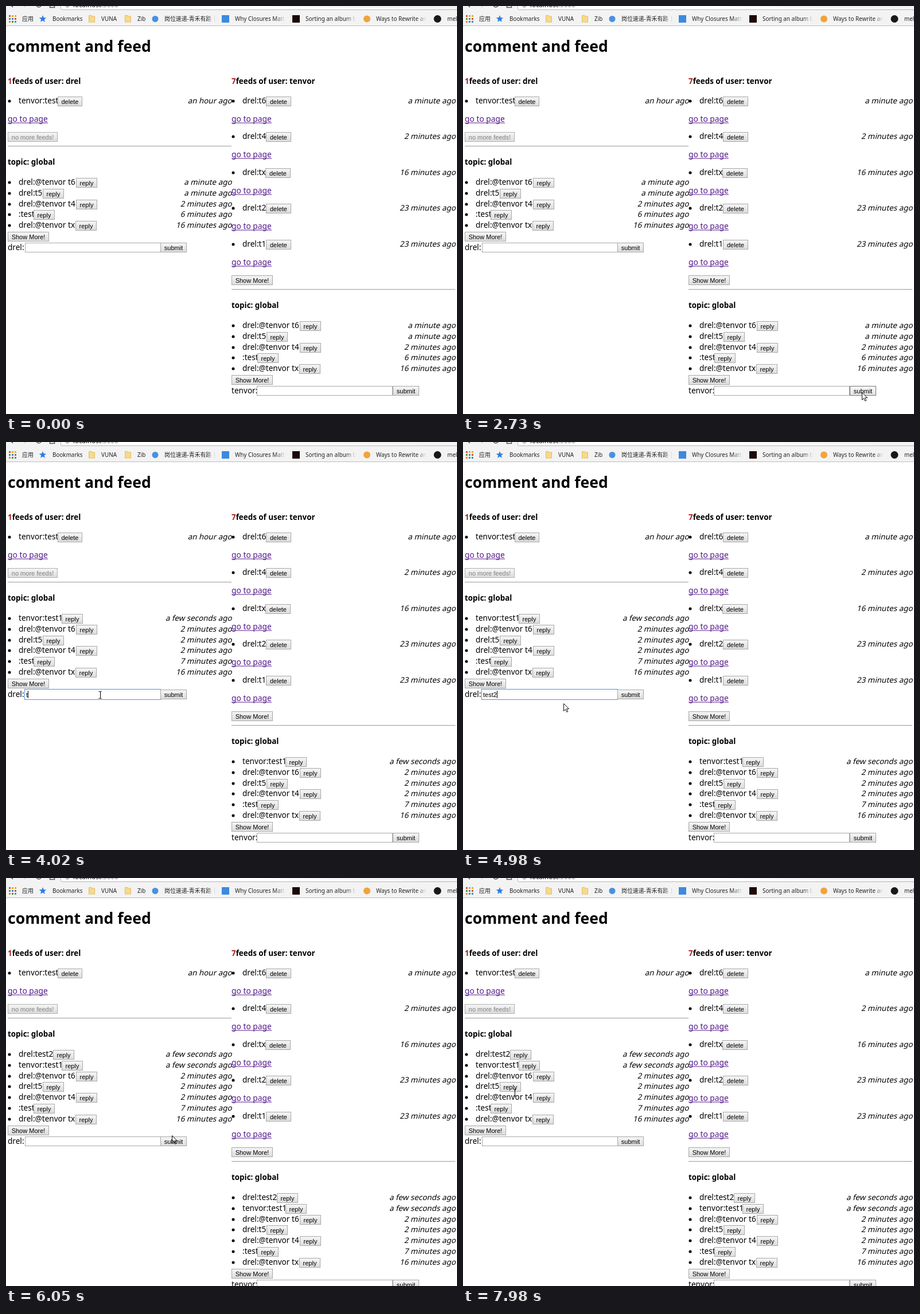
Animation, 786 px wide and 712 px high, one loop 8000 ms. Source, as an HTML page:

```html
<!DOCTYPE html>
<html lang="en">
<head>
<meta charset="utf-8">
<title>comment and feed</title>
<style>
  html, body { margin: 0; width: 100%; height: 100%; overflow: hidden; background: #fff; }
  svg { display: block; }
  text { font: 13.6px 'Noto Sans', 'Noto Sans CJK SC', 'Noto Sans CJK JP', sans-serif; white-space: pre; }
  .h1 { font-size: 26.6px; font-weight: 700; }
  .h4 { font-size: 13.4px; font-weight: 700; }
  .count { fill: #b01e1e; }
  .link { font-size: 13.8px; fill: #551a8b; }
  .age { font-size: 13.4px; text-anchor: end; }
  .ui { font: 11px 'Liberation Sans', Arial, sans-serif; }
  .label { text-anchor: middle; }
  .mark { font-size: 9.9px; fill: #222; }
  .url { font-size: 11.6px; }
</style>
</head>
<body>
<svg id="stage" width="786" height="712" viewBox="0 0 786 712">
  <defs>
    <linearGradient id="face" x2="0" y2="1"><stop stop-color="#f6f6f6"/><stop offset="1" stop-color="#dcdcdc"/></linearGradient>
    <linearGradient id="hover" x2="0" y2="1"><stop stop-color="#fafafa"/><stop offset="1" stop-color="#e2e2e2"/></linearGradient>
    <linearGradient id="pressed" x2="0" y2="1"><stop stop-color="#d4d4d4"/><stop offset="1" stop-color="#ececec"/></linearGradient>
    <linearGradient id="fade"><stop stop-color="#f3f3f3" stop-opacity="0"/><stop offset="1" stop-color="#f3f3f3"/></linearGradient>
  </defs>
  <g id="page"></g>
  <g id="live"></g>
</svg>
<script>
const LOOP = 8000, ROW = 18.8, COLUMN = 390, DROP = 250;
const LEFT = 'drel', RIGHT = 'tenvor';
const page = document.getElementById('page');
const live = document.getElementById('live');

const text = (x, y, s, cls = '') => `<text x="${x}" y="${y}" class="${cls}">${s}</text>`;
const rect = (x, y, w, h, fill, extra = '') =>
  `<rect x="${x}" y="${y}" width="${w}" height="${h}" fill="${fill}" ${extra}/>`;
const circle = (x, y, r, fill) => `<circle cx="${x}" cy="${y}" r="${r}" fill="${fill}"/>`;
const path = (d, stroke, fill = 'none', width = 1) =>
  `<path d="${d}" fill="${fill}" stroke="${stroke}" stroke-width="${width}"/>`;

function button(x, y, w, label, look = 'face') {
  const off = look === 'off';
  const border = off ? '#b0b0b0' : look === 'face' ? '#a8a8a8' : '#777';
  return rect(x + .5, y + .5, w - 1, 16, `url(#${off ? 'face' : look})`, `stroke="${border}"`) +
    `<text class="ui label" x="${x + w / 2}" y="${y + 12.5}" fill="${off ? '#808080' : '#000'}">${label}</text>`;
}

const age = (x, y, s) =>
  `<text class="age" transform="translate(${x - .5} ${y}) skewX(-13)">${s} ago</text>`;

function entry(x, y, s, buttonX, label, width, when) {
  return circle(x + 6, y - 4, 2.5, '#000') + text(x + 22, y, s) +
    button(x + buttonX, y - 12, width, label) + age(x + 394, y, when);
}

const link = (x, y) => text(x + 3, y, 'go to page', 'link') +
  rect(x + 3, y + 1.5, 70, 1, '#551a8b');

const heading = (x, count, user) =>
  `<text class="h4" x="${x + 3}" y="135.5"><tspan class="count">${count}</tspan>feeds of user: ${user}</text>`;

const rule = (x, y) => rect(x + 3, y, 390, 1, '#9a9a9a');

function toolbar() {
  let s = rect(0, 0, 786, 34, '#f3f3f3') + rect(0, 34, 786, 1, '#bdbdbd');
  s += path('M95.5 -6V4Q95.5 6.5 98 6.5H790', '#b5b5b5', '#fff');
  s += path('M7 -3L12 2', '#555', 'none', 1.6) + path('M37 -3L32 2', '#ccc', 'none', 1.6);
  s += path('M52.5 -1Q57 5 62 -1M76.5 -4V2.5H84.5V-4', '#555', 'none', 1.5);
  s += path('M103 -1Q107 5 111 -1', '#666');
  s += `<text class="url" x="117" y="2">localhost<tspan fill="#777">:3000</tspan></text>`;

  const dots = ['#dd4b39', '#f4a000', '#e0b000', '#3c9b4c', '#4285d8', '#dd4b39', '#f08030', '#3c9b4c', '#4285d8'];
  dots.forEach((c, i) => s += rect(5 + i % 3 * 5, 16 + Math.floor(i / 3) * 5, 3, 3, c));
  s += '<path d="M64 16l1.7 4.2 4.5.3-3.5 2.9 1.2 4.4-3.9-2.4-3.9 2.4 1.2-4.4-3.5-2.9 4.5-.3z" fill="#2f7de1"/>';
  for (const x of [144, 207])
    s += path(`M${x + .5} 16.5h4.5l1 1.5h4.5v10h-10z`, '#e4bd61', '#f8d98b');
  s += circle(260, 22.5, 5.5, '#4a90e2') + rect(376, 16, 13, 13, '#3b8ae0') +
    rect(499, 16, 13, 13, '#1c0808') + circle(629, 22.5, 6, '#f2a33c') + circle(752, 22.5, 6.5, '#181818');

  for (const [x, label] of [[28, '应用'], [81, 'Bookmarks'], [166, 'VUNA'], [229, 'Zib'],
    [276, '岗位速递-青禾有路'], [769, 'mell']])
    s += text(x, 26, label, 'mark');
  for (const [x, label] of [[399, 'Why Closures Matter'], [522, 'Sorting an album by'], [645, 'Ways to Rewrite an']])
    s += `<svg x="${x}" y="12" width="88" height="20">${text(0, 14, label, 'mark')}</svg>` +
      rect(x + 70, 14, 18, 17, 'url(#fade)');
  return s + rect(350, 14, 11, 17, 'url(#fade)') + rect(363, 17, 1, 11, '#ddd');
}

function staticPage() {
  let s = toolbar() + text(3, 80, 'comment and feed', 'h1');
  s += heading(0, 1, LEFT) + entry(0, 170, RIGHT + ':test', 90, 'delete', 43, 'an hour') +
    link(0, 202) + button(3, 220, 87, 'no more feeds!', 'off') + rule(0, 244);
  s += heading(COLUMN, 7, RIGHT);
  const feeds = [['t6', 'a minute'], ['t4', '2 minutes'], ['tx', '16 minutes'], ['t2', '23 minutes'], ['t1', '23 minutes']];
  feeds.forEach(([topic, when], i) => {
    const y = Math.round(170 + i * 62.4);
    s += entry(COLUMN, y, `${LEFT}:${topic}`, topic === 'tx' ? 62 : 63, 'delete', 44, when) + link(COLUMN, y + 32);
  });
  s += button(393, 470, 72, 'Show More!') + rule(COLUMN, 494);
  return s + text(3, 277, 'topic: global', 'h4') + text(393, 527, 'topic: global', 'h4');
}

// Each comment: text, button x, ages before, after the first and after the second post.
const FEW = 'a few seconds', TWO = '2 minutes';
const comments = [
  [LEFT + ':test2', 82, ['', '', FEW]],
  [RIGHT + ':test1', 97, ['', FEW, FEW]],
  [`${LEFT}:@${RIGHT} t6`, 122, ['a minute', TWO, TWO]],
  [LEFT + ':t5', 64, ['a minute', TWO, TWO]],
  [`${LEFT}:@${RIGHT} t4`, 122, [TWO, TWO, TWO]],
  [':test', 48, ['6 minutes', '7 minutes', '7 minutes']],
  [`${LEFT}:@${RIGHT} tx`, 121, Array(3).fill('16 minutes')]
];

const forms = [
  { x: 0, y: 0, user: LEFT, inputX: 33, submitX: 269, word: 'test2', keys: [4020, 4190, 4270, 4340, 4810],
    focus: 3500, press: 5890, clear: 5960 },
  { x: COLUMN, y: DROP, user: RIGHT, inputX: 437, submitX: 674, word: 'test1', keys: [1370, 1460, 1530, 1780, 2250],
    focus: 1000, press: 2490, clear: 2640 }
];

// Pointer moves: start, end, number of visible steps, destination.
const moves = [
  [210, 670, 7, 584, 677],
  [1220, 1370, 3, 690, 683],
  [1610, 1610, 1, 693, 682],
  [1850, 1850, 1, 695, 674],
  [2950, 3340, 6, 164, 441],
  [4420, 4420, 1, 170, 445],
  [4980, 5050, 2, 180, 466],
  [5200, 5580, 6, 289, 449],
  [6910, 7290, 6, 460, 567],
  [7440, 7520, 2, 479, 575],
  [7590, 7980, 6, 90, 374]
];

function pointerAt(t) {
  let x = 718, y = 714;
  for (const [start, end, steps, toX, toY] of moves) {
    if (t < start) break;
    const gap = (end - start) / (steps - 1) || 1;
    const p = Math.min(steps, 1 + Math.floor((t - start) / gap + 1e-6)) / steps;
    const eased = p * p * (3 - 2 * p);
    x += (toX - x) * eased;
    y += (toY - y) * eased;
  }
  return { x: Math.round(x), y: Math.round(y) };
}

const inside = (p, x, y, w, h) => p.x >= x && p.x <= x + w && p.y >= y && p.y <= y + h;
const inputTop = (form, state) => Math.round(413 + form.y + state * ROW);

function topic(form, state, t, pointer) {
  let s = '';
  comments.filter(c => c[2][state]).forEach(([label, buttonX, ages], i) => {
    s += entry(form.x, Math.round(312 + form.y + i * ROW), label, buttonX, 'reply', 37, ages[state]);
  });
  const y = inputTop(form, state), { inputX, submitX } = form;
  s += button(form.x + 3, y - 19, 72, 'Show More!');
  s += text(form.x + 3, y + 12.5, form.user + ':');

  const focused = t >= form.focus && t < form.press;
  s += focused ? rect(inputX - .5, y - .5, 237, 18, '#fff', 'stroke="#4d90e0"')
    : rect(inputX + .5, y + .5, 236, 16, '#fff', 'stroke="#a9a9a9"');
  const typed = t < form.clear ? form.keys.filter(k => k <= t).length : 0;
  if (typed) s += text(inputX + 2, y + 12.5, form.word.slice(0, typed), 'ui');
  const lastInput = Math.max(form.focus, ...form.keys.filter(k => k <= t));
  if (focused && (t - lastInput) % 1000 < 510) {
    const widths = [0, 3, 9, 15, 18, 24];
    s += rect(inputX + 2 + widths[typed], y + 2, 1, 13, '#000');
  }

  const look = t >= form.press && t < form.press + 70 ? 'pressed'
    : inside(pointer, submitX, y, 46, 17) ? 'hover' : 'face';
  return s + button(submitX, y, 46, 'submit', look);
}

function drawPointer(pointer, t, state) {
  const { x, y } = pointer;
  const beam = forms.some(f => inside(pointer, f.inputX, inputTop(f, state), 236, 17)) ||
    (state === 2 && inside(pointer, 22, 300, 90, 130));
  if (beam)
    return path(`M${x - 2.5} ${y - 5.5}h2l.5 .5l.5 -.5h2M${x + .5} ${y - 5}v11M${x - 2.5} ${y + 6.5}h2l.5 -.5l.5 .5h2`, '#000');
  const fill = t >= 6050 && t < 6370 ? 'none' : '#fff';
  return path(`M${x + .5} ${y + .5}v13l3 -3l2.2 4.8l2.1 -1l-2.2 -4.6h4z`, '#111', fill);
}

function render(t) {
  const state = t < 2790 ? 0 : t < 6050 ? 1 : 2;
  const pointer = pointerAt(t);
  return forms.map(f => topic(f, state, t, pointer)).join('') +
    (t >= 210 ? drawPointer(pointer, t, state) : '');
}

let shown = '';
const begin = performance.now();
function tick() {
  const next = render((performance.now() - begin) % LOOP);
  if (next !== shown) live.innerHTML = shown = next;
  requestAnimationFrame(tick);
}
page.innerHTML = staticPage();
tick();
</script>
</body>
</html>
```
